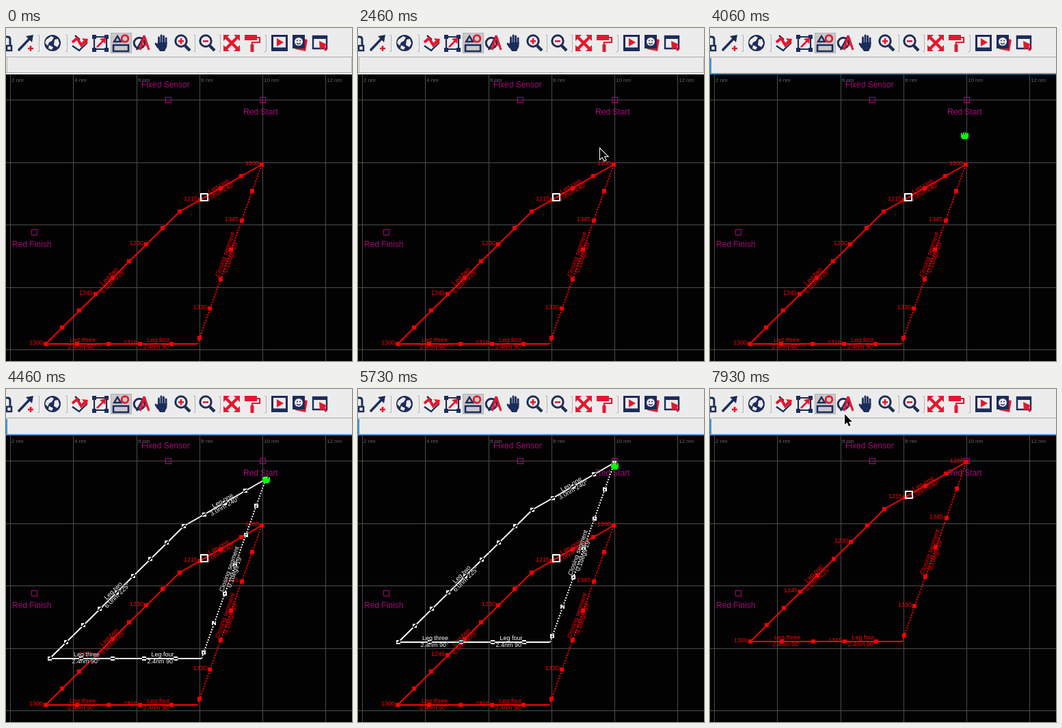
An HTML page with a canvas that plays this animation: 506 px wide and 488 px high, repeating every 8000 ms.

```html
<!DOCTYPE html>
<html lang="en">
<head>
<meta charset="utf-8">
<title>Dragging a track</title>
<style>
  html, body { margin: 0; width: 506px; height: 488px; overflow: hidden; background: #000; }
  canvas { display: block; }
</style>
</head>
<body>
<canvas id="stage" width="506" height="488"></canvas>
<script>
const ctx = document.getElementById('stage').getContext('2d');
const LOOP = 8000, TICK = 1000 / 15;
const NAVY = '#1c2c5b', RED = '#e5172f', PAPER = '#ececec', PURPLE = '#a8077c';
const FONT = '"Liberation Sans", Arial, sans-serif';

// Pointer path: tick, x, y
const POINTER = [
  [5, 309, 452], [8, 262, 330], [11, 205, 165], [14, 158, 42], [16, 148, 12],
  [17, 154, 15], [18, 164, 18], [19, 173, 20], [26, 173, 20], [29, 196, 40],
  [33, 285, 112], [37, 354, 177], [39, 366, 188], [40, 371, 200], [42, 373, 202],
  [52, 373, 202], [55, 372, 188], [59, 368, 168], [63, 375, 145], [67, 380, 132],
  [72, 380, 122], [77, 378, 118], [86, 375, 112], [113, 375, 112],
  [114, 362, 104], [116, 290, 66], [118, 212, 42], [119, 197, 37]
];
const HAND_FROM = 40, FOCUS = 50, GRAB = 53, REST = 86, DROP = 95, PLACED = 107, HAND_TO = 114;

const TRACK = [[374, 200], [254, 269], [58, 463], [280, 463]];
const MARKS = [
  ...spread([374, 200], [254, 269], 4), ...spread([229, 293], [58, 463], 7),
  [104, 463], [150, 463], [196, 463], [242, 463], ...spread([283, 454], [360, 239], 5)
];
const TIMES = [
  ['1200', 350, 201], ['1215', 260, 253], ['1230', 181, 318], ['1245', 107, 391],
  ['1300', 34, 464], ['1315', 172, 464], ['1330', 274, 412], ['1345', 320, 283]
];
const LEGS = [
  ['Leg one', 311, 232, -30], ['3.0nm 240°', 314, 240, -30],
  ['Leg two', 151, 364, -45], ['6.0nm 225°', 157, 371, -45],
  ['Leg three', 112, 458, 0], ['2.4nm 90°', 111, 468, 0],
  ['Leg four', 223, 458, 0], ['2.4nm 90°', 221, 468, 0],
  ['Closing segment', 321, 332, -70.5], ['0.1degs 19°', 329, 335, -70.5]
];

function spread(a, b, n) {
  return Array.from({ length: n + 1 }, (_, i) =>
    a.map((v, k) => Math.round(v + (b[k] - v) * i / n)));
}

function pointerAt(n) {
  const i = POINTER.findIndex(p => p[0] >= n);
  const b = POINTER[i], a = POINTER[Math.max(0, i - 1)];
  const f = b[0] === a[0] ? 0 : (n - a[0]) / (b[0] - a[0]);
  return [Math.round(a[1] + (b[1] - a[1]) * f), Math.round(a[2] + (b[2] - a[2]) * f)];
}

function rect(x, y, w, h, color) {
  ctx.fillStyle = color;
  ctx.fillRect(x, y, w, h);
}

function fill(d, color) {
  ctx.fillStyle = color;
  ctx.fill(new Path2D(d));
}

function line(d, color, width) {
  ctx.strokeStyle = color;
  ctx.lineWidth = width;
  ctx.stroke(new Path2D(d));
}

function dot(x, y, r, color, width) {
  ctx.beginPath();
  ctx.arc(x, y, r, 0, 7);
  ctx.fillStyle = ctx.strokeStyle = color;
  ctx.lineWidth = width;
  width ? ctx.stroke() : ctx.fill();
}

function text(s, x, y, size, color) {
  ctx.font = size + 'px ' + FONT;
  ctx.fillStyle = color;
  ctx.fillText(s, x, y);
}

function magnifier(x, plus) {
  line(`M${x + 4} 26L${x + 11} 33`, NAVY, 4.5);
  dot(x - 2, 19, 8.2, NAVY, 3);
  rect(x - 6, 18, 8, 2.6, RED);
  if (plus) rect(x - 3.3, 15, 2.6, 8.6, RED);
}

function toolbar(focus) {
  rect(0, 0, 506, 68, PAPER);
  rect(153, 7, 31, 30, '#c9c9c9');
  ctx.strokeStyle = '#b2b2b2';
  ctx.lineWidth = 1;
  ctx.strokeRect(153.5, 7.5, 30, 29);
  for (const x of [48, 89, 276, 313, 380]) line(`M${x - 2} 10.5H${x + 0.5}V34.5H${x - 2}`, '#b4b4b4', 1);

  // Line and arrow
  line('M-2 13H3Q6 13 6 17V25', NAVY, 3);
  line('M1 26H8V33H1Z', NAVY, 2.6);
  line('M18 33L35 15', NAVY, 3.5);
  fill('M40 10L38 21L29 12Z', NAVY);
  line('M32 30H40M36 26V34', RED, 2.6);

  // Globe
  dot(68, 22, 12, NAVY);
  fill('M59 17L66 12L70 14L67 19L63 21L61 26L57 22Z', PAPER);
  fill('M71 17L76 16L78 23L75 28L70 25ZM63 25L69 28L67 32L62 30Z', PAPER);

  // Zigzag and frame
  line('M97 26L107 33L119 21', NAVY, 2.4);
  line('M101 11L108 17', NAVY, 2.4);
  line('M97 21L104 15L110 25L116 19', RED, 4);
  fill('M111 15L120 16L118 25Z', RED);
  line('M129 13H147V31H129Z', NAVY, 2.2);
  for (const [x, y] of [[126, 10], [144, 10], [126, 29], [144, 29]]) rect(x, y, 6, 6, NAVY);
  line('M133 28L142 19', RED, 2.6);
  fill('M146 14L145 23L137 16Z', RED);

  // Shapes
  line('M163 12L168 20H158Z', NAVY, 2.4);
  dot(174, 15.5, 4.8, RED, 2.8);
  line('M157 25H179V34H157Z', NAVY, 2.6);

  // Compasses
  dot(195, 22, 7.8, NAVY, 3);
  line('M191 32L202 12', NAVY, 2.6);
  line('M202 11L196 32M202 11L209 32', RED, 3.2);
  line('M199 25H207', RED, 2);

  // Hand
  ctx.lineCap = 'round';
  line('M223.5 22V14M227 22V11M230.5 22V12M234 23V15M222 28L219 23', NAVY, 2.8);
  ctx.lineCap = 'butt';
  fill('M222 21H235.4V27L232 34H225L220 26Z', NAVY);

  magnifier(258, true);
  magnifier(294, false);

  // Expand
  line('M321 13L339 31M339 13L321 31', RED, 4.4);
  fill('M318 10H327L318 19ZM342 10V19L333 10ZM318 34V25L327 34ZM342 34H333L342 25Z', RED);

  // Roller
  rect(349, 10, 18, 8, RED);
  line('M367 14H371V21H360V25', RED, 2.2);
  rect(357.5, 24, 5, 11, RED);

  // Player, cards, window
  line('M389.5 11.5H410.5V32.5H389.5Z', NAVY, 3);
  line('M389 30H411', NAVY, 3);
  fill('M396 15L406 21L396 27Z', RED);
  fill('M425 14L441 17L438 34L423 31Z', RED);
  rect(419, 10, 18, 20, NAVY);
  dot(428, 20, 6, PAPER);
  dot(426, 18.5, 1, NAVY);
  dot(430, 18.5, 1, NAVY);
  line('M425 22Q428 25 431 22', NAVY, 1.3);
  line('M449 12H469V30H449Z', NAVY, 2.4);
  rect(448, 11, 22, 5, NAVY);
  fill('M458 19L471 25L466 27L470 32L467 34L463 29L459 32Z', RED);

  // Entry bar
  rect(0, 42, 506, 1, '#a9a9a9');
  rect(0, 43, 506, 25, '#ebebeb');
  if (focus) {
    rect(0, 44, 2, 23, '#3f8fe0');
    rect(0, 66, 506, 2, '#4a95e0');
  } else {
    rect(0, 65, 506, 1, '#a9a9a9');
    rect(0, 66, 506, 2, '#f4f4f4');
    rect(1, 43, 1, 23, '#b5b5b5');
    rect(505, 43, 1, 23, '#b5b5b5');
  }
}

function chart() {
  rect(0, 68, 506, 420, '#020203');
  for (const x of [6, 98, 191, 283, 375, 467]) rect(x, 68, 1, 420, '#4c4c4c');
  for (const y of [105, 197, 288, 380, 471]) rect(0, y, 506, 1, '#4c4c4c');
  [6, 98, 191, 283, 375, 467].forEach((x, i) => text(2 * i + 2 + ' nm', x + 2, 79, 8, '#666'));
  ctx.strokeStyle = PURPLE;
  ctx.lineWidth = 1;
  for (const [x, y] of [[237, 105], [375, 105], [41, 299]]) ctx.strokeRect(x - 3.5, y - 3.5, 8, 8);
  text('Fixed Sensor', 198, 87, 12, PURPLE);
  text('Red Start', 347, 127, 12, PURPLE);
  text('Red Finish', 9, 321, 12, PURPLE);
}

function track(dx, dy, color, ghost) {
  ctx.save();
  ctx.translate(dx, dy);
  if (ghost) ctx.globalCompositeOperation = 'difference';
  line('M' + TRACK.join('L'), color, 2);
  ctx.setLineDash([2, 2]);
  line('M280 463L374 200', color, 2);
  ctx.setLineDash([]);
  for (const [x, y] of MARKS) rect(x - 3, y - 3, 6, 6, color);
  ctx.textAlign = 'center';
  ctx.textBaseline = 'middle';
  for (const [s, x, y, deg] of LEGS) {
    ctx.save();
    ctx.translate(x, y);
    ctx.rotate(deg * Math.PI / 180);
    text(s, 0, 0, deg ? 9.4 : 9, color);
    ctx.restore();
  }
  ctx.textAlign = 'left';
  ctx.textBaseline = 'alphabetic';
  if (!ghost) {
    for (const [s, x, y] of TIMES) text(s, x, y, 9, color);
    ctx.strokeStyle = '#fff';
    ctx.lineWidth = 2;
    ctx.strokeRect(285, 243, 10, 10);
  }
  ctx.restore();
}

function arrow(x, y) {
  ctx.save();
  ctx.translate(x, y);
  const d = 'M0 0V15L3.5 12L6 17.5L8.5 16.5L6 11H11Z';
  line(d, '#fff', 2);
  fill(d, '#000');
  ctx.restore();
}

function hand(x, y, closed) {
  ctx.save();
  ctx.translate(x, y);
  const tip = closed ? -4 : -6;
  for (const i of [0, 1, 2, 3]) rect(i * 3 - 5, tip + (i % 3 ? 0 : 1), 2, -tip, '#0f0');
  if (!closed) line('M-4 3L-6.5 -1', '#0f0', 2);
  fill('M-5 -1H6V3L4 6H-3L-5 3Z', '#0f0');
  ctx.restore();
}

function draw(t) {
  const n = Math.floor((t + 8) / TICK);
  const held = n >= GRAB && n < DROP;
  toolbar(n >= FOCUS);
  chart();
  if (n >= PLACED) track(1, -93, '#f00');
  else track(0, 0, '#f00');

  if (n < POINTER[0][0]) return;
  const [x, y] = pointerAt(Math.min(n, 119));
  // The outline blinks while it is being redrawn
  const step = Math.min(n, REST);
  if (held && step % 11 % 2) {
    const lead = Math.max(0, step - 67) * 4 / 19;
    track(x - 374, Math.round(y - 200 - lead), '#fff', true);
  }
  if (n >= HAND_FROM && n < HAND_TO) hand(x, y, held && n > 55);
  else arrow(x, y);
}

const start = performance.now();
function frame() {
  draw((performance.now() - start) % LOOP);
  requestAnimationFrame(frame);
}
frame();
</script>
</body>
</html>
```
